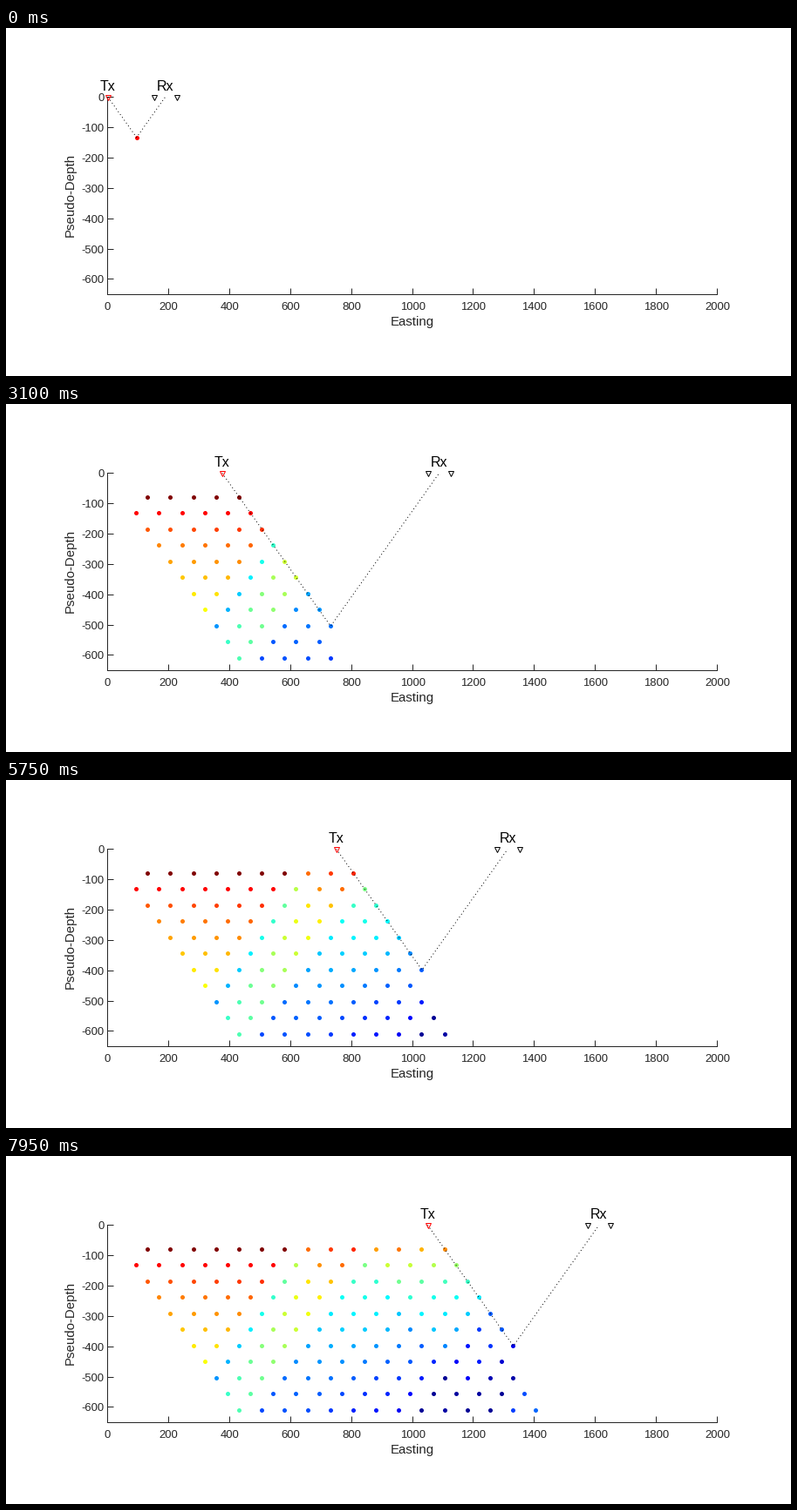
Recreate the animation shown at these times as a matplotlib script. Size 900 by 400 pixels, loop 8000 ms.

```python
import numpy as np
import matplotlib.pyplot as plt
from matplotlib.animation import FuncAnimation

DPI = 100
PX = 72 / DPI                      # one pixel in points
STEP = 75                          # station spacing
INK = "#262626"

plt.rcParams["font.family"] = "Liberation Sans"

# Value by dipole separation, then shifts by receiver station
LEVEL = [1.0, .875, .79, .745, .715, .68, .645, .62, .59, .57, .555]
SHIFT = [-.32, -.14, -.105, -.36, -.35, -.355, -.375, -.40,
         -.41, -.44, -.55, -.52, -.59, -.60, -.42, -.38]
SHALLOW = [.77, .82, .84, .72, .76, .70, .74]


def to_x(east):
    return 116.98 + east * 0.34905


def to_y(depth):
    return 79.5 + depth * 0.349


def pixel(v):
    """Centre of the pixel that holds v."""
    return np.floor(v) + 0.5


def value(i, k):
    m = i + k
    if m < 8:
        return LEVEL[k] + (0.008 * i if k > 1 else 0)
    if k == 0:
        return SHALLOW[m - 8]
    side = 0.05 if i > 10 else -0.02 if i == 10 else 0
    return min(max(LEVEL[k] + SHIFT[m - 8] + side, 0.02), 1)


def jet(v):
    return tuple(np.clip(1.5 - abs(4 * v - c), 0, 1) for c in (3, 2, 1))


# The survey: every transmitter station reads its receivers outwards
readings = [(i, k) for i in range(15) for k in range(11)][1:161]
FRAMES = len(readings)


def geometry(i, k):
    tx = STEP * i
    sep = STEP * (k + 1.5)
    return tx, tx + sep / 2, sep / np.sqrt(2), tx + sep


spots = []
for i, k in readings:
    _, mid, depth, _ = geometry(i, k)
    spots.append((pixel(to_x(mid)), pixel(to_y(depth))))
spots = np.array(spots)
colors = np.array([jet(value(i, k)) for i, k in readings])

fig = plt.figure(figsize=(9, 4), dpi=DPI, facecolor="white")
ax = fig.add_axes([0, 0, 1, 1])
ax.set_xlim(0, 900)
ax.set_ylim(400, 0)
ax.axis("off")


def rule(xs, ys):
    ax.plot(xs, ys, color=INK, lw=PX, solid_capstyle="butt",
            snap=False, zorder=1)


def label(x, y, text, size, color=INK, ha="center", **kw):
    return ax.text(x, y, text, fontsize=size * PX, color=color,
                   ha=ha, va="baseline", **kw)


left, right = pixel(to_x(0)), pixel(to_x(2000))
top, bottom = pixel(to_y(0)), pixel(to_y(650))
rule([left, left], [top - 0.5, bottom + 0.5])
rule([left, right + 0.5], [bottom, bottom])
for east in range(0, 2001, 200):
    x = pixel(to_x(east))
    rule([x, x], [bottom, bottom - 7])
    label(x, 324.5, str(east), 13)
for depth in range(0, 601, 100):
    y = pixel(to_y(depth))
    rule([left, left + 7], [y, y])
    label(112.5, y + 4.5, str(-depth), 13, ha="right")
label(466, 342, "Easting", 15)
label(78, 192, "Pseudo-Depth", 15, rotation=90, rotation_mode="anchor")

dots = ax.scatter([], [], s=(5 * PX) ** 2, linewidths=0, snap=False, zorder=2)
ray, = ax.plot([], [], color="black", lw=PX, ls=(0, (1, 3)),
               dash_capstyle="butt", snap=False, zorder=3)
mark = dict(ls="none", marker="v", ms=5.6 * PX, mfc="none", mew=PX,
            snap=False, zorder=4)
sender, = ax.plot([], [], mec="red", **mark)
receivers, = ax.plot([], [], mec="black", **mark)
tx_text = label(0, 72, "Tx", 16, "black")
rx_text = label(0, 72, "Rx", 16, "black")


def draw(n):
    tx, mid, depth, rx = geometry(*readings[n])
    dots.set_offsets(spots[:n + 1])
    dots.set_facecolors(colors[:n + 1])
    ray.set_data([to_x(tx), to_x(mid), to_x(rx)], [top, to_y(depth), top])
    sender.set_data([pixel(to_x(tx))], [top + 0.5])
    pair = np.array([rx - STEP / 2, rx + STEP / 2])
    receivers.set_data(pixel(to_x(pair)), [top + 0.5] * 2)
    tx_text.set_x(to_x(tx))
    rx_text.set_x(to_x(rx))
    return dots, ray, sender, receivers, tx_text, rx_text


anim = FuncAnimation(fig, draw, frames=FRAMES, init_func=lambda: draw(0),
                     interval=50, repeat=True, repeat_delay=0, blit=False)
plt.show()
```
